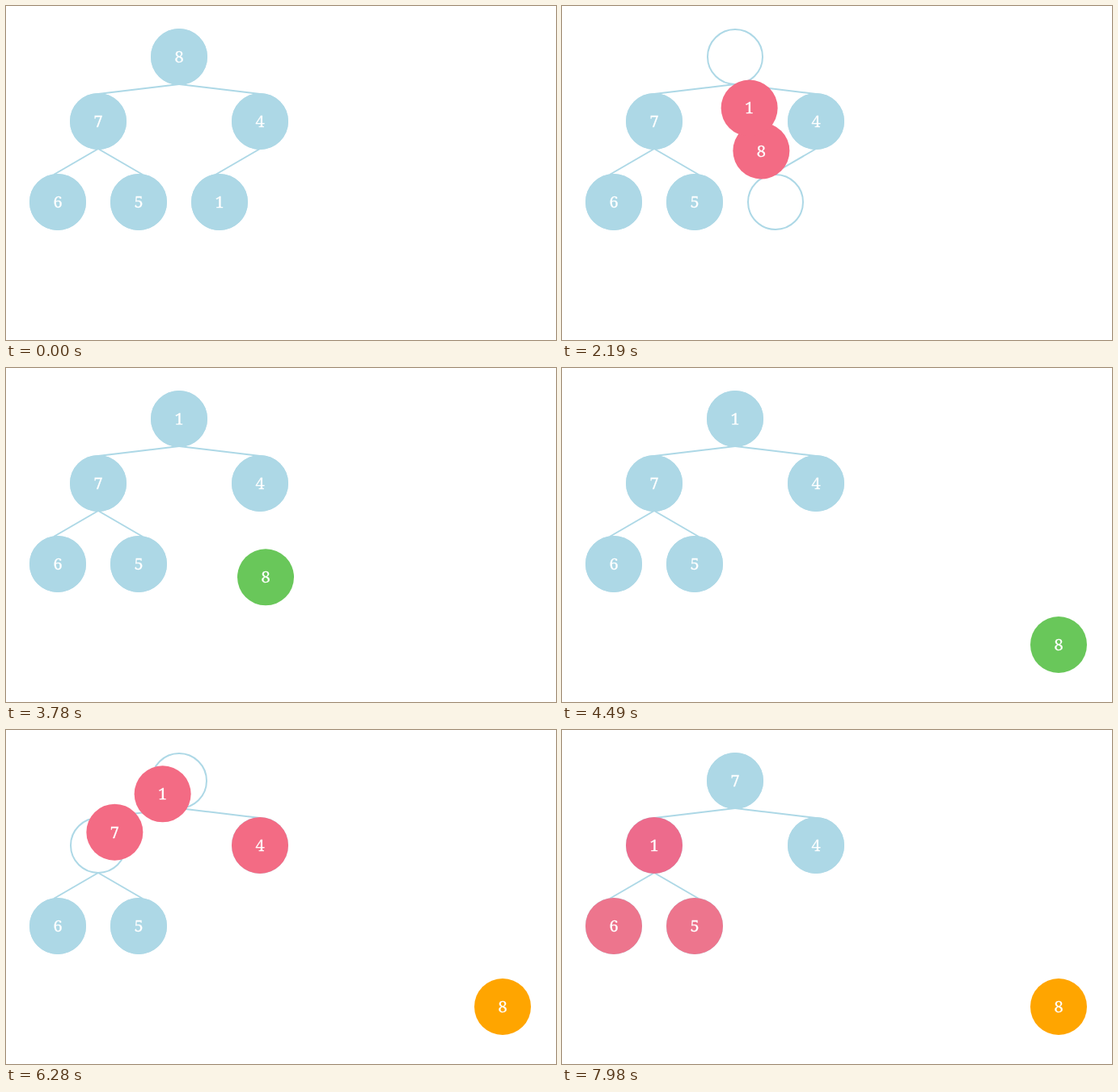
An HTML page that plays this animation: 680x414 px, repeating every 8000 ms.

```html
<!DOCTYPE html>
<html lang="en">
<head>
<meta charset="utf-8">
<title>Heap sort</title>
<style>
  html, body { margin: 0; width: 100%; height: 100%; overflow: hidden; background: #fff; }
  svg { display: block; width: 680px; height: 414px; }
  .tree { fill: none; stroke: #add8e6; stroke-width: 2; }
  text { font: 20px "Noto Serif", serif; fill: #fff; stroke: #fff; stroke-width: .3; text-anchor: middle; }
</style>
</head>
<body>
<svg viewBox="0 0 680 414">
  <g class="tree" id="tree"></g>
  <g id="nodes"></g>
</svg>
<script>
const LOOP = 8000, FADE = 500, MOVE = 800;
const BLUE = [173, 216, 230], PINK = [243, 107, 132], BROWN = [191, 131, 128],
      GREEN = [105, 199, 90], ORANGE = [255, 165, 0], PURPLE = [179, 107, 224];

const slots = [[214, 63], [114, 143], [314, 143], [64, 243], [164, 243], [264, 243]];
const edges = [[0, 114, 109], [0, 314, 109], [1, 59, 209], [1, 169, 209], [2, 259, 209]];
const sorted = [614, 343];
const DETACH = 3670;

// Steps: [start, duration, value]
const nodes = [
  { label: 8, slot: 0,
    fills: [[880, FADE, PINK], [2685, 85, BROWN], [2770, 415, GREEN], [4525, FADE, ORANGE]],
    moves: [[1890, MOVE, slots[5]], [DETACH, MOVE, sorted]] },
  { label: 7, slot: 1,
    fills: [[5170, FADE, PINK], [6960, FADE, BLUE]],
    moves: [[6154, MOVE, slots[0]]] },
  { label: 4, slot: 2,
    fills: [[5170, FADE, PINK], [6960, FADE, BLUE]], moves: [] },
  { label: 6, slot: 3, fills: [[7660, FADE, PINK]], moves: [] },
  { label: 5, slot: 4, fills: [[7660, FADE, PINK]], moves: [] },
  { label: 1, slot: 5,
    fills: [[880, FADE, PINK], [2685, FADE, BLUE], [5170, FADE, PINK],
            [6960, FADE, PURPLE], [7660, FADE, PINK]],
    moves: [[1890, MOVE, slots[0]], [6154, MOVE, slots[1]]] }
];

function add(parent, tag, attrs) {
  const el = document.createElementNS("http://www.w3.org/2000/svg", tag);
  for (const key in attrs) el.setAttribute(key, attrs[key]);
  return parent.appendChild(el);
}

// cubic-bezier(.25, .1, .25, 1), solved for x by bisection
function ease(x) {
  if (x <= 0) return 0;
  if (x >= 1) return 1;
  const curve = (u, a, b) => 3 * u * (1 - u) ** 2 * a + 3 * u * u * (1 - u) * b + u ** 3;
  let lo = 0, hi = 1;
  for (let i = 0; i < 20; i++) {
    const mid = (lo + hi) / 2;
    if (curve(mid, .25, .25) < x) lo = mid; else hi = mid;
  }
  return curve(lo, .1, 1);
}

function valueAt(start, steps, time) {
  return steps.reduce((from, [begin, length, to]) => {
    const p = ease((time - begin) / length);
    return from.map((v, i) => v + (to[i] - v) * p);
  }, start);
}

const tree = document.getElementById("tree");
const lines = edges.map(([parent, x2, y2]) => {
  const [x1, y] = slots[parent];
  return add(tree, "line", { x1, y1: y + 34, x2, y2 });
});
const rings = slots.map(([cx, cy]) => add(tree, "circle", { cx, cy, r: 34 }));
const lastLeaf = [lines[4], rings[5]];

for (const node of nodes) {
  node.group = add(document.getElementById("nodes"), "g", {});
  node.disc = add(node.group, "circle", { r: 35 });
  add(node.group, "text", { y: 7 }).textContent = node.label;
}

function draw(now) {
  const time = now % LOOP;
  for (const { slot, fills, moves, group, disc } of nodes) {
    const [x, y] = valueAt(slots[slot], moves, time);
    group.setAttribute("transform", `translate(${x.toFixed(2)} ${y.toFixed(2)})`);
    disc.setAttribute("fill", `rgb(${valueAt(BLUE, fills, time).map(Math.round)})`);
  }
  for (const el of lastLeaf) el.style.visibility = time < DETACH ? "visible" : "hidden";
}

const began = performance.now();
function tick() {
  draw(performance.now() - began);
  requestAnimationFrame(tick);
}
tick();
</script>
</body>
</html>
```
